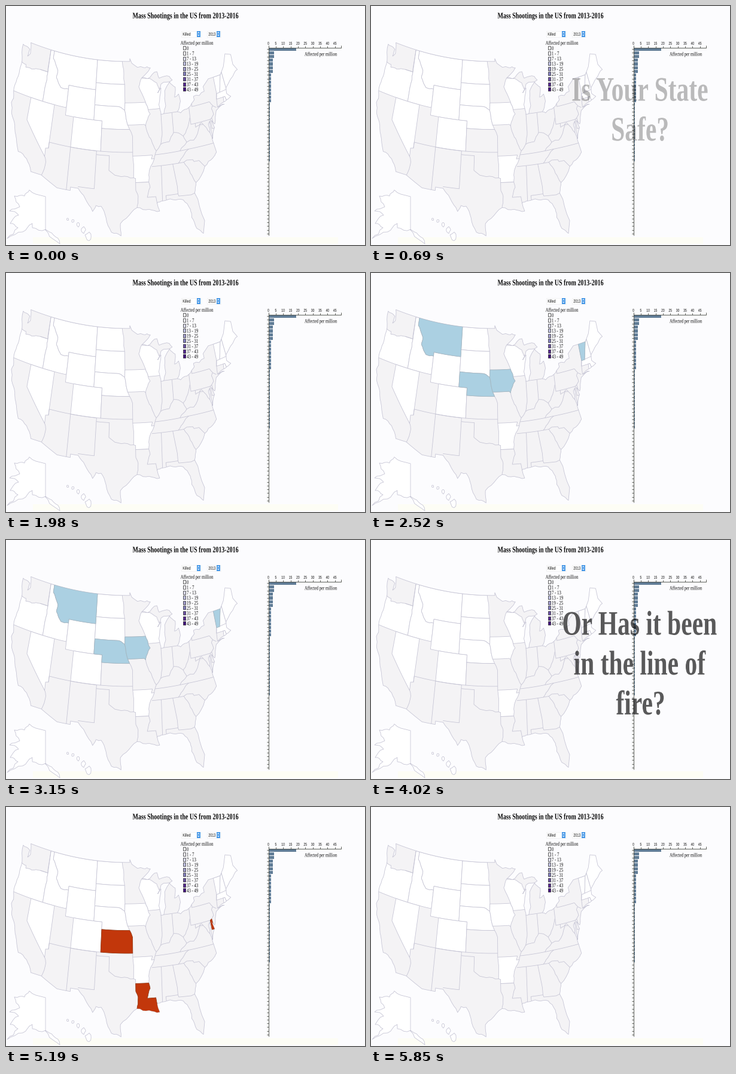
These frames come from a looping animation (600x400 px, 5880 ms). A matplotlib script:

```python
import numpy as np
import matplotlib.pyplot as plt
from matplotlib.animation import FuncAnimation
from matplotlib.collections import LineCollection, PolyCollection
from matplotlib.patches import PathPatch, Rectangle
from matplotlib.path import Path
from matplotlib.textpath import TextPath

W, H = 600, 400
STEP, LOOP = 30, 5880
SQUEEZE = 523 / 724          # the whole page is narrowed by this ratio
PAPER, INK = "#fcfcfe", "#080808"
FILL, EDGE, AXIS = "#f4f3f5", "#c5c4d4", "#4c4f48"
BLUE, RED, STEEL = "#abd0e2", "#c2370b", "#607c96"

rng = np.random.default_rng(5)
fig = plt.figure(figsize=(W / 100, H / 100), dpi=100, facecolor=PAPER)
ax = fig.add_axes([0, 0, 1, 1])
ax.set(xlim=(0, W), ylim=(H, 0))
ax.axis("off")


def px(n):
    return n * 0.72


def p(*v):
    return list(zip(v[::2], v[1::2]))


def wild(*v, amp=0.09):
    """Coast or river: key points joined by midpoint displacement."""
    pts = np.array(v, float).reshape(-1, 2)
    for _ in range(2):
        d = np.diff(pts, axis=0)
        bend = d[:, ::-1] * [1, -1] * rng.uniform(-amp, amp, (len(d), 1))
        out = np.empty((2 * len(pts) - 1, 2))
        out[::2], out[1::2] = pts, pts[:-1] + d / 2 + bend
        pts = out
    return [tuple(q) for q in pts]


def rect(west, east, south, north):
    return p(west, north, east, north, east, south, west, south)


def albers(points):
    lon, lat = np.array(points).T
    s1, s2 = np.sin(np.radians([29.5, 45.5]))
    n = (s1 + s2) / 2
    rho = np.sqrt(1 - s1**2 + 2 * n * s1 - 2 * n * np.sin(np.radians(lat))) / n
    t = n * np.radians(96 - lon)
    return np.column_stack([201.8 + 523 * rho * np.sin(t),
                            -705 + 724 * rho * np.cos(t)])


def project(points, closed=True):
    """Bend long parallels by stepping about one degree at a time."""
    if closed:
        points = points + points[:1]
    out = points[:1]
    for (a, b), (c, d) in zip(points, points[1:]):
        k = int(abs(c - a)) + 1
        out = out + [(a + (c - a) * i / k, b + (d - b) * i / k) for i in range(1, k + 1)]
    return albers(out)


# coast and frontier, degrees west and north
pacific = wild(122.76, 49, 122.3, 47.6, 122.9, 47.1, 122.7, 48.1, 124.7, 48.4, 124.05, 46.25,
               124.1, 44.5, 124.5, 42.84, 124.1, 41, 124.4, 40.4, 123.75, 39, 122.5, 37.7,
               121.9, 36.6, 120.6, 34.55, 118.5, 34, 117.12, 32.53)
mexico = p(114.8, 32.5, 111.07, 31.33, 108.2, 31.33, 108.2, 31.78) + wild(
    106.53, 31.78, 104.9, 30.6, 103.15, 28.98, 102.5, 29.8, 101.4, 29.77, 100.3, 28.3,
    99.1, 26.4, 97.15, 25.96)
gulf = wild(97.15, 25.96, 97.3, 27.6, 95, 29.1, 93.84, 29.7, 91.3, 29.4, 89.1, 29.05,
            89.55, 30.18, 88.4, 30.35, 86.2, 30.35, 84, 30.1, 82.7, 28.7, 82.6, 27.6,
            81.8, 26, 80.6, 25.15)
atlantic = wild(80.05, 26.8, 81.45, 30.72, 80.9, 32.03, 78.55, 33.86, 76.55, 34.65,
                75.55, 35.25, 76, 36.9, 76.3, 38, 76.4, 39.2, 76, 39.5, 76, 38.2, 75.95, 37.15,
                75.1, 38.5, 75.55, 39.5, 74.9, 38.95, 74.05, 40.6, 71.9, 41.07, 73.6, 40.95,
                71.5, 41.4, 69.95, 41.75, 70.8, 42.3, 70.7, 43.07, 69, 44, 66.97, 44.8)
lakes = p(67.8, 45.7, 67.8, 47.07, 69.23, 47.45, 70.3, 45.9, 71.08, 45.3, 71.5, 45.01,
          74.7, 45) + wild(
    76.3, 44.2, 76.2, 43.55, 79.05, 43.27, 78.95, 42.8, 80.52, 41.98, 82.7, 41.5, 83.45, 41.73,
    82.45, 43, 82.7, 44, 83.8, 43.7, 83.4, 45, 84.75, 45.78, 86.2, 44.7, 86.2, 42.8,
    86.8, 41.76, 87.5, 41.7, 87.9, 43, 87.1, 45.2, 88, 44.6, 87, 45.7, 84, 46, 84.6, 46.5,
    87.4, 46.5, 87.9, 47.4, 90.4, 46.6, 92.05, 46.72, 89.6, 48, 91.4, 48.1, 94.6, 48.75)
nation = project(pacific + mexico + gulf + atlantic + lakes + p(95.15, 49.38, 95.15, 49))

# borders used on both sides
columbia = wild(124.5, 46.25, 122.85, 45.95, 122.75, 45.6, 121.2, 45.65, 118.98, 46)
snake = wild(116.92, 46, 116.85, 44.9, 117.03, 43.9)
rockies = wild(116.05, 48, 114.4, 46.6, 114.5, 45.6, 113, 44.45, 111.05, 44.47)
platte = wild(96.5, 42.5, 98.5, 43)
missouri = wild(96.5, 42.5, 95.77, 40.58)
dubuque = wild(91.22, 43.5, 90.65, 42.5)

# rings may overrun the coast: everything is clipped to the nation
plain = dict(
    OR=columbia + snake + p(117.03, 42, 125, 42),
    ID=p(117.04, 49, 116.05, 49) + rockies + p(111.05, 42, 117.03, 42) + snake[::-1],
    MT=p(116.05, 49, 104.05, 49, 104.05, 45, 111.05, 45) + rockies[::-1],
    NV=p(120, 42, 120, 39, 114.63, 35, 114.7, 36.1, 114.05, 36.2, 114.04, 42),
    WY=rect(111.05, 104.05, 41, 45),
    CO=rect(109.05, 102.05, 37, 41),
    ND=p(104.05, 49) + wild(97.23, 49, 96.8, 46.7, 96.56, 45.94) + p(104.05, 45.94),
    SD=p(104.05, 45.94, 96.56, 45.94, 96.45, 43.5) + platte + p(104.05, 43),
    NE=p(104.05, 43) + platte[::-1] + missouri
    + p(95.3, 40, 102.05, 40, 102.05, 41, 104.05, 41),
    IA=p(96.45, 43.5) + dubuque + wild(90.65, 42.5, 90.2, 41.9, 91.1, 41, 91.42, 40.4)
    + p(91.73, 40.6) + missouri[::-1],
    AR=p(94.62, 36.5, 90.1, 36.5, 90.37, 36) + wild(89.7, 36, 91.1, 33.9, 91.15, 33)
    + p(94.04, 33.02, 94.04, 33.55, 94.48, 33.64, 94.43, 35.4),
    WI=wild(92.05, 46.72, 92.85, 45.6, 91.22, 43.5) + dubuque + p(87, 42.5, 86.9, 45.3)
    + wild(87.6, 45.1, 88.1, 45.9, 90.4, 46.6),
    VT=p(73.35, 45.01, 71.5, 45.01, 72.46, 42.73, 73.25, 42.75),
    NH=p(71.5, 45.01, 71.08, 45.3, 70.7, 43.07, 70.7, 42.87, 71.3, 42.7, 72.46, 42.73),
    ME=p(71.08, 45.3, 71, 47.6, 66.5, 47.6, 66.5, 44, 70.7, 43),
    MA=p(73.25, 42.75, 70, 42.9, 69.5, 41.3, 71.12, 41.4, 71.4, 42.02, 73.5, 42.05),
    RI=p(71.8, 42.02, 71.38, 42.02, 71.12, 41.3, 71.85, 41.3),
)
hit_states = dict(
    KS=p(102.05, 40) + wild(95.3, 40, 94.61, 39.1) + p(94.62, 37, 102.05, 37),
    LA=wild(91.15, 33, 90.9, 32.3, 91.6, 31) + p(89.75, 31, 89.55, 30.1, 88.5, 30, 88.5, 28.5)
    + wild(93.84, 29.5, 93.55, 31.2, 94.04, 32) + p(94.04, 33.02),
    DE=p(75.79, 39.72, 75.4, 39.85, 75.25, 39.1, 75, 38.45, 75.7, 38.46),
)
borders = [
    wild(114.63, 35, 114.2, 34.3, 114.72, 32.5),
    p(114.05, 36.2, 114.05, 37, 103, 37, 103.06, 32, 106.62, 32),
    p(109.05, 37, 109.05, 31),
    p(117.04, 49, 117.04, 46.4, 116.92, 46, 118.98, 46),
    p(103, 36.5, 100, 36.5, 100, 34.56) + wild(100, 34.56, 97.2, 33.8, 94.48, 33.64),
    p(94.62, 37, 94.62, 36.5),
    wild(91.42, 40.4, 90.65, 38.9, 90.2, 38.5, 89.15, 37, 89.5, 36.5, 89.7, 36),
    p(90.3, 35, 83.1, 35),
    p(89.45, 36.5, 81.68, 36.59, 75.8, 36.55),
    wild(81.68, 36.59, 82.9, 35.95, 84.32, 35),
    p(88.2, 35, 88.4, 30),
    p(85.6, 35, 85, 32, 85, 31),
    p(87.5, 30, 87.6, 31, 85, 31, 84.86, 30.7, 82.2, 30.57, 81.3, 30.72),
    wild(83.1, 35, 81.9, 33.4, 80.9, 32.03),
    p(83.1, 35, 82.4, 35.2, 81.05, 35.1, 80.8, 34.82, 79.67, 34.8, 78.55, 33.86),
    wild(89.15, 37, 88.05, 37.8, 86, 38, 84.82, 39.1, 82.6, 38.4, 81.75, 39.1, 80.6, 40.6),
    p(80.52, 42, 80.52, 39.72, 75.79, 39.72),
    wild(82.6, 38.4, 81.97, 37.54, 83.68, 36.6),
    wild(81.97, 37.54, 80.3, 37.6, 78.35, 39.4, 77.72, 39.32),
    p(79.48, 39.72) + wild(79.48, 39.2, 78, 39.6, 77.1, 38.9, 76.3, 38),
    wild(88.05, 37.8, 87.53, 39.35) + p(87.53, 41.8),
    p(84.82, 39.1, 84.8, 41.7),
    p(87, 41.76, 83.4, 41.73),
    wild(75.4, 39.85, 74.8, 40.2, 75.1, 41, 74.7, 41.36, 75.35, 42) + p(79.76, 42, 79.76, 42.4),
    p(74.7, 41.36, 73.9, 41),
    p(73.6, 41, 73.5, 42.05, 73.25, 42.75),
]
# stage pixels
alaska = p(66, 319) + wild(
    50, 315, 39, 308, 31, 318, 14, 318, 23, 336, 6, 343, 21, 350, 7, 364, 20, 371, 2, 389,
    28, 378, 44, 364, 44, 371, 66, 374, 79, 383, 90, 398, 70, 379, amp=0.16) + p(66, 375)


def island(t):
    a = np.arange(0, 2 * np.pi, 0.7)
    r = (1.8 + 4 * t**2) * rng.uniform(0.75, 1.25, a.size)
    return np.column_stack([103 + 35 * t + 0.9 * r * np.cos(a),
                            357 + 29 * t**1.7 + 1.2 * r * np.sin(a)])


def regions(shapes, face, edge=EDGE, clip=True, **kw):
    art = ax.add_collection(PolyCollection(shapes, facecolors=face, edgecolors=edge,
                                           linewidths=px(0.8), **kw))
    if clip:
        art.set_clip_path(Path(nation), transform=ax.transData)
    return art


def box(x, y, w, h, face, edge="none", lw=0.6):
    ax.add_patch(Rectangle((x, y), w, h, fc=face, ec=edge, lw=px(lw)))


def lines(segs, color, lw=0.9):
    return ax.add_collection(LineCollection(segs, colors=color, linewidths=px(lw)))


def label(s, x, y, size, family="Liberation Serif", weight="normal", mid=False):
    path = TextPath((0, 0), s, size=size, prop={"family": family, "weight": weight})
    v = path.vertices * [SQUEEZE, -1]
    if mid:
        x -= path.get_extents().intervalx.mean() * SQUEEZE
    return ax.add_patch(PathPatch(Path(v + [x, y], path.codes), fc=INK, ec="none", zorder=4))


def headline(*rows):
    return [label(s, 449.5, 158.5 + 66.7 * i, 57.5, weight="bold", mid=True)
            for i, s in enumerate(rows)]


box(45, 387, 510, 11, "#fdfdf5")
lines([[(0, 399.5), (W, 399.5)]], "#85857f", 1)

# map
regions([nation], FILL, "none")
regions([project(s) for s in plain.values()], "white")
regions([project(s) for s in hit_states.values()], FILL)
lines([project(s, False) for s in borders], EDGE, 0.8).set_clip_path(
    Path(nation), transform=ax.transData)
lines([np.vstack([nation, nation[:1]])], EDGE, 0.8)
regions([alaska] + [island(k / 4) for k in range(5)], "white", clip=False)
blue = regions([project(plain[k]) for k in ("MT", "NE", "IA", "VT")], BLUE, "#a3b6c0", zorder=3)
red = regions([project(s) for s in hit_states.values()], RED, "#9a3a10", zorder=3)

label("Mass Shootings in the US from 2013-2016", 300, 20.5, 13.8, weight="bold", mid=True)

# menus
for x, w, s in ((293, 33, "Killed"), (336, 23, "2013")):
    box(x, 41.5, w, 10.5, "white", "#ececec")
    label(s, x + 2.3, 49.6, 7.5, "Liberation Sans")
    cx = x + w - 4.2
    box(cx - 3.2, 41.8, 6.4, 10, "#4496e6")
    lines([[(cx - 1.6, 46.8 + d), (cx, 46.8 + 2.8 * d), (cx + 1.6, 46.8 + d)] for d in (-1, 1)],
          "white")

# legend
label("Affected per million", 291.7, 64.7, 9.3)
for i in range(9):
    y = 70.5 + 8.62 * i
    box(295.5, y - 3.2, 4.5, 6, plt.cm.Purples(i / 8), "#3c3c3c", 0.8)
    label(f"{6 * i - 5} - {6 * i + 1}" if i else "0", 302, y + 3.3, 9.4)

# bar chart
ROW, X0, UNIT = 6.17, 438.5, 2.47
for i, n in enumerate(np.repeat([19, 4, 3, 2, 1], [1, 2, 4, 8, 16])):
    box(X0, 69.7 + ROW * i, n * UNIT, 5.2, STEEL)
end = X0 + 49 * UNIT
lines([[(X0, 66), (X0, 69.5), (end, 69.5), (end, 66)], [(X0, 69.5), (X0, 384)]], AXIS)
lines([[(436, 72.3 + ROW * i), (X0, 72.3 + ROW * i)] for i in range(51)], AXIS)
for n in range(0, 46, 5):
    x = X0 + n * UNIT
    lines([[(x, 66.5), (x, 69.5)]], AXIS)
    label(str(n), x, 64.8, 7, "Liberation Sans", mid=True)
label("Affected per million", 499, 83.3, 9.2)

ask = headline("Is Your State", "Safe?")
fire = headline("Or Has it been", "in the line of", "fire?")

# fade in from, to; fade out from, to (ms)
cues = [(ask, (480, 1260, 1460, 1970)),
        ([blue], (2010, 2400, 3180, 3510)),
        (fire, (3480, 4290, 4380, 4890)),
        ([red], (4890, 5130, 5500, 5835))]


def draw(i):
    changed = []
    for parts, times in cues:
        level = np.interp(i * STEP, times, (0, 1, 1, 0))
        for part in parts:
            part.set_alpha(level)
            changed.append(part)
    return changed


anim = FuncAnimation(fig, draw, frames=LOOP // STEP, interval=STEP, repeat=True,
                     repeat_delay=0, cache_frame_data=False)
plt.show()
```
